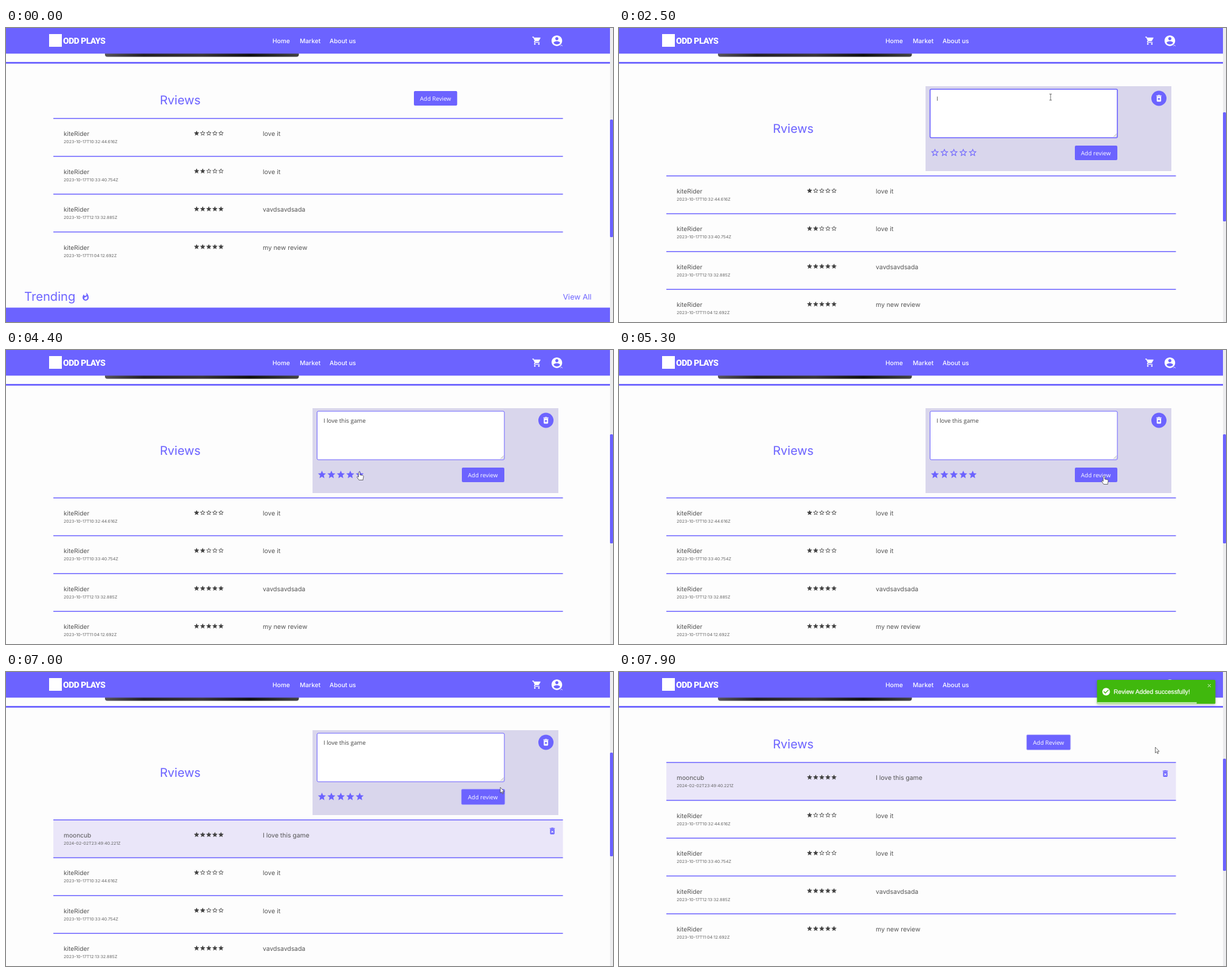
Recreate the animation shown at these times as an HTML page. Size 1000 by 485 pixels, loop 8 s.

```html
<!DOCTYPE html>
<html lang="en">
<head>
<meta charset="utf-8">
<title>Reviews</title>
<style>
html, body { margin: 0; width: 100%; height: 100%; overflow: hidden; background: #fdfdfd; }
svg { display: block; width: 100vw; height: 100vh; }
text { font-family: Inter, sans-serif; text-rendering: geometricPrecision; white-space: pre; }
.ui { font-family: "Open Sans", "Noto Sans", sans-serif; }
.toast { font-family: "Liberation Sans", Arial, sans-serif; }
.brand { font-family: Roboto, sans-serif; font-weight: 900; letter-spacing: -.5px; }
.nav { font-weight: 500; }
</style>
</head>
<body>
<svg id="stage" viewBox="0 0 1000 485"></svg>
<script>
const LOOP = 8000, STEP = 100;
const PURPLE = '#6c63ff', GREY = '#555';
const stage = document.getElementById('stage');

// 24-unit icon outlines
const ICONS = {
  star: 'M12 17.27 18.18 21l-1.64-7.03L22 9.24l-7.19-.61L12 2 9.19 8.63 2 9.24l5.46 4.73L5.82 21z',
  hollow: 'M22 9.24l-7.19-.62L12 2 9.19 8.63 2 9.24l5.46 4.73L5.82 21 12 17.27 18.18 21l-1.63-7.03L22 9.24zM12 15.4l-3.76 2.27 1-4.28-3.32-2.88 4.38-.38L12 6.1l1.71 4.04 4.38.38-3.32 2.88 1 4.28z',
  trash: 'M6 19c0 1.1.9 2 2 2h8c1.1 0 2-.9 2-2V7H6v12zm2.46-7.12 1.41-1.41L12 12.59l2.12-2.12 1.41 1.41L13.41 14l2.12 2.12-1.41 1.41L12 15.41l-2.12 2.12-1.41-1.41L10.59 14l-2.13-2.12zM15.5 4l-1-1h-5l-1 1H5v2h14V4z',
  cart: 'M7 18c-1.1 0-2 .9-2 2s.9 2 2 2 2-.9 2-2-.9-2-2-2zM1 2v2h2l3.6 7.59-1.35 2.45c-.16.28-.25.61-.25.96 0 1.1.9 2 2 2h12v-2H7.42c-.14 0-.25-.11-.25-.25l.03-.12.9-1.63h7.45c.75 0 1.41-.41 1.75-1.03l3.58-6.49c.5-.9-.1-1.48-.88-1.48H5.21l-.94-2H1zm16 16c-1.1 0-2 .9-2 2s.9 2 2 2 2-.9 2-2-.9-2-2-2z',
  user: 'M12 2C6.48 2 2 6.48 2 12s4.48 10 10 10 10-4.48 10-10S17.52 2 12 2zm0 3c1.66 0 3 1.34 3 3s-1.34 3-3 3-3-1.34-3-3 1.34-3 3-3zm0 14.2c-2.5 0-4.71-1.28-6-3.22.03-1.99 4-3.08 6-3.08 1.99 0 5.97 1.09 6 3.08-1.29 1.94-3.5 3.22-6 3.22z',
  fire: 'M13.5.67s.74 2.65.74 4.8c0 2.06-1.35 3.73-3.41 3.73-2.07 0-3.63-1.67-3.63-3.73l.03-.36C5.21 7.51 4 10.62 4 14c0 4.42 3.58 8 8 8s8-3.58 8-8C20 8.61 17.41 3.8 13.5.67zM11.71 19c-1.78 0-3.22-1.4-3.22-3.14 0-1.62 1.05-2.76 2.81-3.12 1.77-.36 3.6-1.21 4.62-2.58.39 1.29.59 2.65.59 4.04 0 2.65-2.15 4.8-4.8 4.8z',
  check: 'M12 2C6.48 2 2 6.48 2 12s4.48 10 10 10 10-4.48 10-10S17.52 2 12 2zm-2 15-5-5 1.41-1.41L10 14.17l7.59-7.59L19 8l-9 9z'
};

const POINTERS = {
  arrow: 'M0 0v9.5l2.2-2 1.5 3.3 1.4-.6-1.5-3.2h3z',
  hand: 'M0 0c.8 0 1.2.6 1.2 1.2V5l4.5 1c1 .3 1.4 1 1.3 2l-.8 3.8v1.7H-.5L-3.6 9c-.5-.8.4-1.8 1.3-1.2l1.1.9V1.2C-1.2.6-.8 0 0 0z',
  beam: 'M-2-5h4M0-5v10M-2 5h4'
};

const REVIEWS = [
  ['kiteRider', '2023-10-17T10:32:44.616Z', 1, 'love it'],
  ['kiteRider', '2023-10-17T10:33:40.754Z', 2, 'love it'],
  ['kiteRider', '2023-10-17T12:13:32.885Z', 5, 'vavdsavdsada'],
  ['kiteRider', '2023-10-17T11:04:12.692Z', 5, 'my new review']
];
const NEW_REVIEW = ['mooncub', '2024-02-02T23:49:40.221Z', 5, 'I love this game'];

// pointer way points: time, x, y
const PATH = [
  [200, 992, 250], [500, 860, 210], [700, 860, 210], [1300, 711, 114],
  [3500, 711, 114], [3600, 561, 199], [4400, 582, 201], [4800, 700, 206],
  [4900, 700, 206], [5300, 799, 208], [6000, 799, 208], [6500, 801, 203],
  [6900, 801, 203], [7600, 894, 114], [7700, 894, 114], [7900, 883.5, 124]
];

const within = (t, a, b) => t >= a && t < b;
const rect = (x, y, w, h, fill, more = '') =>
  `<rect x="${x}" y="${y}" width="${w}" height="${h}" fill="${fill}" ${more}/>`;
const text = (x, y, size, fill, words, kind = '') =>
  `<text x="${x}" y="${y}" font-size="${size}" fill="${fill}" class="${kind}">${words}</text>`;
const icon = (name, x, y, size, fill) =>
  `<path d="${ICONS[name]}" fill="${fill}" transform="translate(${x} ${y}) scale(${size / 24}) translate(-12 -12)"/>`;
const stars = (count, x, y, gap, size, fill) =>
  [0, 1, 2, 3, 4].map(i => icon(i < count ? 'star' : 'hollow', x + i * gap, y, size, fill)).join('');

function button(x, y, w, h, label, ring) {
  const grow = ring ? .6 : 0;
  return rect(x - grow, y - grow, w + 2 * grow, h + 2 * grow, PURPLE, `rx="2" stroke="${ring || 'none'}"`) +
    text(x + 10, y + 16, 9.6, '#fff', label, 'ui');
}

function header() {
  return rect(163, 36, 319.5, 11.5, 'url(#photo)', 'rx="4"') +
    rect(0, 56, 995, 2.8, PURPLE) +
    rect(0, 0, 995, 42.3, PURPLE) +
    rect(71, 10, 21, 21, '#fff') +
    text(94, 25.5, 14, '#fff', 'ODD PLAYS', 'brand') +
    text(439, 24.5, 10.2, '#fff', 'Home', 'nav') +
    text(484, 24.5, 10.2, '#fff', 'Market', 'nav') +
    text(533, 24.5, 10.2, '#fff', 'About us', 'nav') +
    icon('cart', 874.5, 21, 16, '#fff') +
    icon('user', 907.5, 21, 21, '#fff') +
    '<path d="M913.4 29.8l1.7-1.6 1.7 1.6" fill="none" stroke="#fff" stroke-width=".8"/>';
}

function form(t) {
  const focus = within(t, 2500, 4200);
  const typed = t < 2500 ? '' : t < 3000 ? 'I' : t < 3100 ? 'I love this' : 'I love this game';
  return rect(505, 96, 405, 140, '#d9d6ec') +
    rect(512.5, 101, 308.5, 80, '#fff', `rx="2" stroke="${PURPLE}" stroke-width="${focus ? 1.6 : 1}"`) +
    text(523, 120, 9.6, '#444', typed, 'ui') +
    '<path d="M815 179.5l5-5M818 179.5l2-2" stroke="#666" stroke-width=".6"/>' +
    `<circle cx="889.5" cy="116" r="12.5" fill="${PURPLE}"/>` +
    icon('trash', 889.5, 116, 14.5, '#fff') +
    stars(t < 4200 ? 0 : 5, 520.5, 205.5, 15.55, 15.8, PURPLE) +
    button(751, 194, 70, 24, 'Add review', t >= 6200 ? '#8f88ff' : '');
}

function row([name, date, score, words], y, own) {
  return (own ? rect(78, y, 839.5, 62.4, '#eae6f9') + icon('trash', 900, y + 18.3, 14.5, PURPLE) : '') +
    text(95, y + 29, 10.2, GREY, name) +
    text(95, y + 41, 7, '#666', date) +
    stars(score, 314, y + 24.3, 10.05, 10.6, '#444') +
    text(423, y + 29, 10.4, GREY, words);
}

function list(top, added) {
  const all = added ? [NEW_REVIEW, ...REVIEWS] : REVIEWS;
  const pitch = 62.4, end = top + all.length * pitch;
  return all.map((r, i) => row(r, top + i * pitch, added && i === 0)).join('') +
    all.map((r, i) => rect(78, top + i * pitch - .75, 839.5, 1.5, PURPLE)).join('') +
    text(30, end + 51.4, 20.2, PURPLE, 'Trending') +
    icon('fire', 131.2, end + 44.6, 15, PURPLE) +
    text(917.5, end + 49, 12.5, PURPLE, 'View All') +
    rect(0, end + 62.4, 995, 200, PURPLE);
}

function scrollbar(y, end) {
  return rect(995, 0, 5, 485, '#ececee') + rect(995, y, 5, end - y, PURPLE, 'rx="1.5"');
}

// Slides in from the right, overshoots and settles
function toastShift(p) {
  const keys = [[0, 1560], [.6, -13], [.75, 5], [.9, -2.6], [1, 0]];
  const i = keys.findIndex(k => p < k[0]);
  if (i < 1) return 0;
  const [a, from] = keys[i - 1], [b, to] = keys[i];
  return to + (from - to) * (1 - (p - a) / (b - a)) ** 3;
}

function toast(t) {
  if (t < 6900) return '';
  const left = 1 - Math.max(0, t - 7110) / 5000;
  return `<g transform="translate(${toastShift((t - 6900) / 700)} 0)">` +
    rect(787.5, 13, 195, 39.5, '#40b80c', 'rx="1.5" filter="url(#shadow)"') +
    rect(787.5, 49.8, 195 * left, 2.7, '#c5eab4') +
    icon('check', 802.5, 32.5, 15, '#fff') +
    `<g stroke="#fff" stroke-width=".25">${text(815, 35.5, 10.2, '#fff', 'Review Added successfully!', 'toast')}</g>` +
    '<path d="M970 20l5 5m0-5l-5 5" stroke="#d5f0c8"/></g>';
}

function pointer(t) {
  if (t < PATH[0][0]) return '';
  let i = PATH.findIndex(p => p[0] > t);
  if (i < 0) i = PATH.length - 1;
  const [t0, x0, y0] = PATH[i - 1], [t1, x1, y1] = PATH[i];
  const p = Math.min(1, (t - t0) / (t1 - t0));
  const kind = within(t, 1900, 3600) ? 'beam' :
    within(t, 1200, 1900) || within(t, 3600, 4500) || within(t, 5200, 7000) || within(t, 7500, 7800) ? 'hand' : 'arrow';
  return `<path d="${POINTERS[kind]}" transform="translate(${x0 + (x1 - x0) * p} ${y0 + (y1 - y0) * p})"
    fill="#fff" stroke="#333" stroke-width=".7" stroke-linejoin="round"/>`;
}

const DEFS = `<defs>
  <linearGradient id="photo"><stop stop-color="#57545a"/><stop offset=".2" stop-color="#242124"/>
  <stop offset=".5" stop-color="#3a3638"/><stop offset=".75" stop-color="#111"/><stop offset="1" stop-color="#444"/></linearGradient>
  <filter id="shadow" x="-10%" y="-30%" width="120%" height="170%">
  <feDropShadow dx="0" dy="1" stdDeviation="2" flood-opacity=".25"/></filter></defs>`;

function scene(t) {
  const open = within(t, 1900, 7800), added = t >= 6400;
  const thumb = open ? (added ? [133, 304] : [139, 319]) : (added ? [143, 328] : [151, 345]);
  const ring = added ? '#bdb8fa' : t >= 1300 ? '#4740b5' : '';
  return DEFS + rect(0, 0, 1000, 485, '#fdfdfd') + header() +
    text(253.5, open ? 173 : 125.5, 20, PURPLE, 'Rviews') +
    (open ? form(t) : button(672, 104, 71.3, 24, 'Add Review', ring)) +
    list(open ? 244 : 149.3, added) + scrollbar(...thumb) + toast(t) + pointer(t);
}

let shown = -1;
function frame(now) {
  const t = Math.floor(now % LOOP / STEP) * STEP;
  if (t !== shown) stage.innerHTML = scene(shown = t);
  requestAnimationFrame(frame);
}
frame(performance.now());
</script>
</body>
</html>
```
